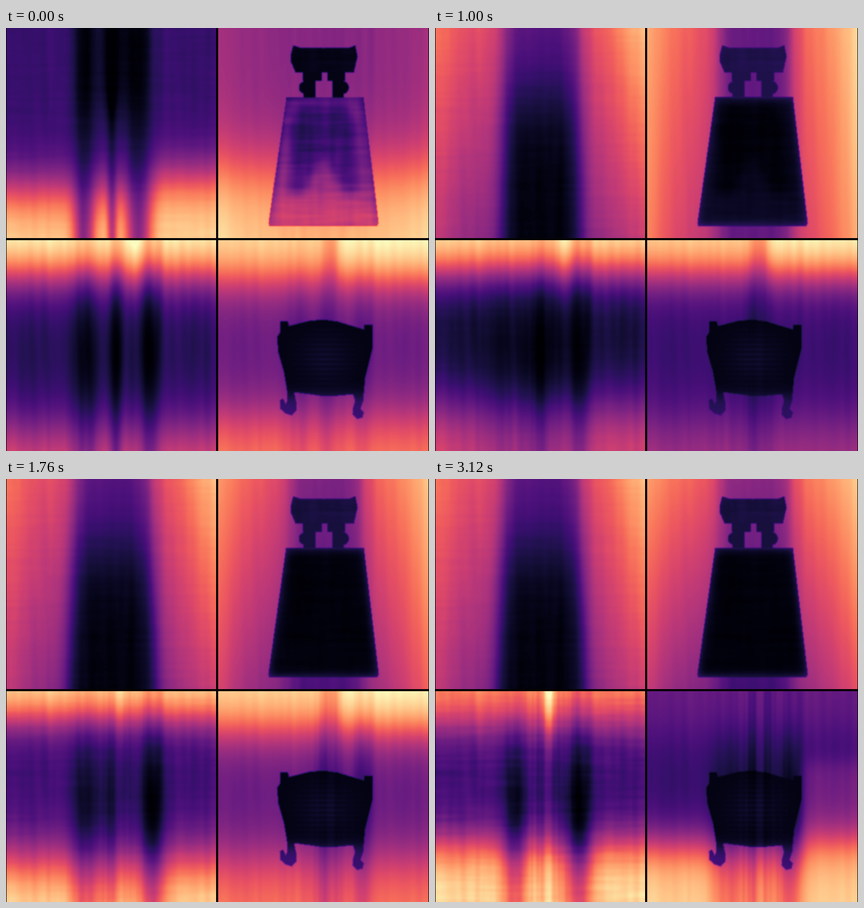
Animation, 600 px wide and 600 px high, one loop 3.52 s. Source, as a matplotlib script:

```python
import matplotlib.pyplot as plt
import numpy as np
from matplotlib.animation import FuncAnimation
from matplotlib.path import Path

SIZE = 300                      # one of four panels
FRAME_MS, HOLD_MS, LOOP_MS = 40, 500, 3520
STATES, LOOKS = 7, 5            # the last looks differ only in fine streaks

axis = np.arange(SIZE)
X, Y = np.meshgrid(axis, axis)
DOWN = Y / SIZE                 # 0 at the top, 1 at the bottom
SIDE = (X - 150) / 150          # -1 left, 1 right
MID = (Y - 150) / 150
rng = np.random.default_rng(4)


def step(t, at, width):
    return 1 / (1 + np.exp(-(t - at) / width))


def bump(t, at, width):
    return np.exp(-((t - at) / width) ** 2)


def band(left, right, soft):
    return step(X, left, soft) * (1 - step(X, right, soft))


def mix(base, value, alpha):
    return base * (1 - alpha) + value * alpha


def blur(field, sx, sy):
    def kernel(sigma):
        w = np.exp(-0.5 * ((axis[:, None] - axis) / sigma) ** 2)
        return w / w.sum(1, keepdims=True)
    return kernel(sy) @ field @ kernel(sx).T


def noise(sx, sy):
    n = blur(rng.standard_normal((SIZE, SIZE)), sx, sy)
    return n / n.std()


def mask(*outlines, soft=1.0):
    points = np.column_stack([X.ravel(), Y.ravel()])
    inside = np.zeros(SIZE * SIZE, bool)
    for outline in outlines:
        inside |= Path(outline).contains_points(points)
    return blur(inside.reshape(SIZE, SIZE).astype(float), soft, soft)


def box(x0, y0, x1, y1):
    return [(x0, y0), (x1, y0), (x1, y1), (x0, y1)]


def disc(cx, cy, r):
    a = np.linspace(0, 2 * np.pi, 24)
    return np.column_stack([cx + r * np.cos(a), cy + r * np.sin(a)])


streaks = noise(3, 70)
weave = (noise(20, 2) + noise(3, 25)) / 1.4
needles = noise(1.6, 150) * bump(X, 162, 32)

head = mask([(107, 24), (115, 27), (150, 28), (188, 27), (195, 24), (198, 40),
             (193, 62), (110, 62), (104, 48), (104, 36)])
legs = mask(box(122, 66, 138, 98), box(163, 66, 178, 98),
            box(121, 60, 147, 74), box(156, 60, 180, 74),
            disc(124, 84, 9), disc(177, 84, 9))
body = mask([(97, 97), (207, 97), (228, 276), (226, 280), (73, 280), (72, 276)])
arch = mask([(116, 108), (184, 108), (196, 140), (200, 232), (182, 238),
             (150, 182), (118, 238), (100, 232), (104, 140)], soft=6)
rim = body * (1 - blur(body, 7, 7))
shield = mask([(88, 115), (99, 115), (101, 122), (130, 115), (150, 113),
               (170, 116), (207, 127), (208, 120), (219, 120), (219, 155),
               (209, 195), (206, 228), (202, 240), (207, 245), (205, 252),
               (198, 254), (191, 247), (192, 238), (195, 228), (192, 219),
               (170, 221), (145, 221), (108, 216), (111, 230), (111, 242),
               (105, 249), (96, 246), (89, 240), (88, 228), (92, 225),
               (96, 233), (99, 228), (98, 213), (94, 188), (86, 160),
               (84, 138), (89, 130)])


def column(look):
    """Upper left: a dark column before a glowing wall."""
    if look == 0:
        wall = .19 + .72 * step(Y, 228 - 18 * step(X, 200, 8), 24)
        depth = .9 - .35 * step(Y, 125, 18)
        dark = bump(X, 110, 15) + bump(X, 188, 18) + .7 * bump(X, 150, 7)
        dark = dark + .9 * bump(X, 150, 26) * (1 - step(Y, 130, 22))
        return wall * (1 - np.minimum(depth * dark, .95))
    if look == 1:
        wall = (.57 + .16 * MID ** 2 + .22 * step(X, 230, 25)
                - .12 * bump(X, 75, 45))
        core = (.2 + .1 * MID ** 2
                - .17 * bump(X, 150, 10) * bump(Y, 135, 58)
                + .2 * bump(X, 150, 25) * step(Y, 262, 14))
        return mix(wall, core, band(100, 203, 4))
    spread = 4 if look == 2 else 11
    wall = (.6 - .2 * DOWN + .1 * bump(X, 0, 35)
            + .3 * step(X, 262, 17) * (1 - .5 * DOWN))
    core = .03 + .25 * (1 - step(Y, 85, 36))
    return mix(wall, core, band(98 - spread * DOWN, 203 + spread * DOWN, 7))


def backdrop(look):
    """Upper right, behind the tapered body."""
    if look == 0:
        return .38 + .48 * step(Y, 200, 32) + .08 * SIDE ** 2
    level, fall, curve, core, core_fall = (
        (.66, 0, .14, .46, -.15), (.58, .1, .3, .3, 0),
        (.57, .22, .27, .36, .12), (.62, .28, .23, .39, .18))[look - 1]
    wall = level - fall * DOWN + curve * SIDE ** 2 + .05 * SIDE
    wall = wall + .06 * MID ** 2 * (look == 1)
    return mix(wall, core - core_fall * DOWN, band(104, 203, 6))


def haze(floor, ceiling, ground, pillars):
    """Dark middle between two glows; each glow is (strength, y, softness)."""
    glow, y, soft = ceiling
    v = floor + glow * (1 - step(Y, y, soft))
    glow, y, soft = ground
    v = v + glow * step(Y, y, soft)
    reach = (.35 + .65 * bump(Y, 160, 75)) * (.25 + .75 * step(Y, 50, 14))
    for x, width, depth in pillars:
        v = v * (1 - depth * reach * bump(X, x, width))
    return v


HAZE = [
    dict(floor=.14, ceiling=(.9, 48, 22), ground=(.5, 268, 26),
         pillars=[(112, 17, .85), (156, 9, .95), (203, 15, .97)]),
    dict(floor=.1, ceiling=(.9, 38, 20), ground=(.25, 270, 26),
         pillars=[(155, 19, .85), (203, 14, .7), (105, 22, .45)]),
    dict(floor=.09, ceiling=(.9, 44, 20), ground=(.5, 238, 27),
         pillars=[(150, 25, .8), (203, 18, .88), (95, 38, .5)]),
    dict(floor=.2, ceiling=(.75, 38, 18), ground=(.75, 240, 26),
         pillars=[(110, 18, .7), (145, 22, .45), (207, 20, .97)]),
    dict(floor=.2, ceiling=(.58, 45, 20), ground=(.72, 216, 20),
         pillars=[(112, 17, .75), (203, 21, .97)]),
]
DUSK = [
    dict(floor=.31, ceiling=(.64, 55, 22), ground=(.42, 250, 24),
         pillars=[(156, 14, .3), (115, 16, .25), (205, 14, .2)]),
    dict(floor=.18, ceiling=(.78, 45, 20), ground=(.2, 280, 25),
         pillars=[(155, 15, .45)]),
    dict(floor=.19, ceiling=(.75, 48, 20), ground=(.28, 260, 25),
         pillars=[(155, 17, .4)]),
    dict(floor=.3, ceiling=(.64, 55, 22), ground=(.42, 238, 25),
         pillars=[(155, 20, .4), (205, 15, .45)]),
    dict(floor=.18, ceiling=(.13, 60, 22), ground=(.72, 218, 20),
         pillars=[(112, 22, .5), (202, 20, .75), (152, 28, .45)]),
]


def pillars(look):
    v = haze(**HAZE[look])
    if look == 1:
        v = v * (1 - .35 * bump(X, 155, 16) * (1 - step(Y, 70, 15)))
    if look < 3:
        return v + .1 * bump(X, 182, 12) * (1 - step(Y, 70, 15))
    shaft = bump(X, 162, 11) * (1 - step(Y, 60, 18))
    return v + (.28 if look == 4 else .08) * shaft


def dusk(look):
    v = haze(**DUSK[look])
    if look < LOOKS - 1:
        return v + .09 * (step(X, 171, 2) - bump(X, 160, 11)) * (1 - step(Y, 55, 18))
    patch = step(X, 222, 4) * step(Y, 100, 9) * (1 - step(Y, 235, 14))
    return v + .14 * patch


HEAD = (.04, .16, .13, .11, .11)


def tapered(look):
    haziness = np.exp(-.8 * look ** 1.6)
    v = backdrop(look) + .006 * streaks
    fill = .02 + haziness * (.3 + .3 * np.clip((Y - 97) / 183, 0, 1) ** 2.5)
    fill = fill - .16 * min(1, 2.2 * haziness) * arch
    fill = fill + (.2 - .45 * haziness) * rim + (.004 + .014 * haziness) * weave
    v = mix(v, np.maximum(fill, .01), body)
    v = mix(v, HEAD[look], legs)
    return mix(v, HEAD[look] + .008 * weave, head)


def shielded(look, fine):
    v = dusk(look) + .008 * streaks + fine * needles
    ripple = bump(X, 152, 38) * bump(Y, 168, 38)
    tone = .035 + ripple * (.04 + .01 * np.sin(Y * .9)) + .4 * fine * needles
    tone = tone + .1 * step(Y, 222, 6)
    return mix(v, tone, shield * (1 - .2 * step(Y, 222, 6)))


def compose(state):
    look = min(state, LOOKS - 1)
    fine = .006 * max(0, min(state, 5) - 1)
    upper = column(look) + .006 * streaks + .004 * weave
    lower = pillars(look) + .012 * streaks + fine * (needles + .4 * weave)
    field = np.block([[upper, tapered(look)], [lower, shielded(look, fine)]])
    image = plt.get_cmap("magma")(np.clip(field, 0, 1))[..., :3]
    image[298:301] = image[:, 298:301] = 0.01
    image[:, [0, -1]] *= 0.3
    return image


stills = [compose(state) for state in range(STATES)]

fig = plt.figure(figsize=(6, 6), dpi=100)
ax = fig.add_axes([0, 0, 1, 1])
ax.axis("off")
picture = ax.imshow(stills[0], interpolation="nearest", aspect="auto")


def update(frame):
    picture.set_data(stills[min(frame * FRAME_MS // HOLD_MS, STATES - 1)])
    return [picture]


anim = FuncAnimation(fig, update, frames=LOOP_MS // FRAME_MS,
                     interval=FRAME_MS, repeat=True, repeat_delay=0)
plt.show()
```
